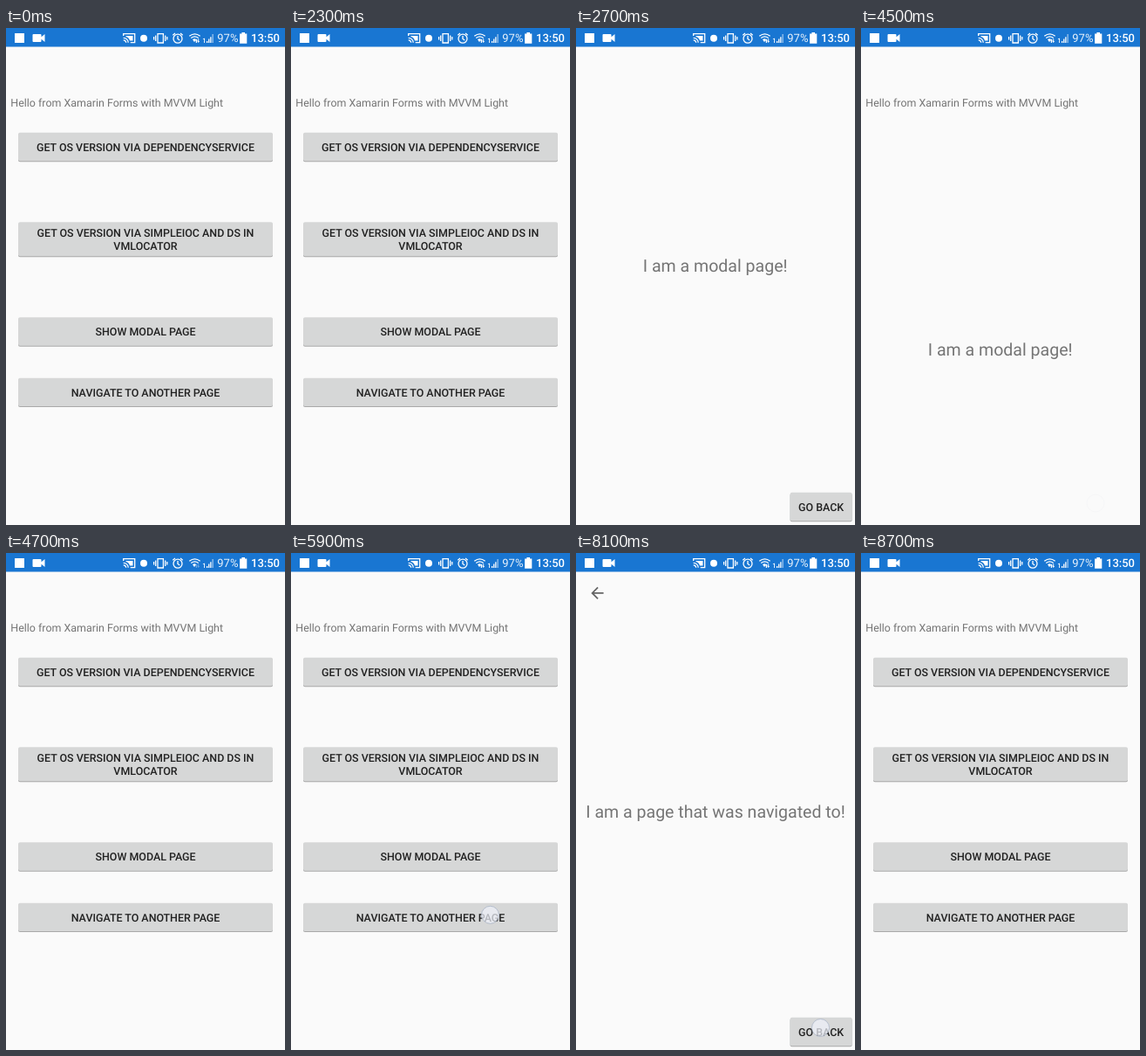
These frames come from a looping animation (320 px wide and 569 px high, 8.8 s). An HTML page:

```html
<!DOCTYPE html>
<html lang="en">
<head>
<meta charset="utf-8">
<title>App navigation</title>
<style>
html, body { margin: 0; width: 100%; height: 100%; overflow: hidden; background: #fafafa; }
svg { display: block; width: 100vw; height: 100vh; }
text { font: 12.44px Roboto, sans-serif; fill: #757575; text-rendering: geometricPrecision; }
.label { font-weight: 500; fill: #212121; text-anchor: middle; }
.title { font-size: 19.56px; text-anchor: middle; }
.face { fill: #d6d7d7; filter: drop-shadow(0 1px .7px rgba(0, 0, 0, .32)); }
#bar text { fill: #fff; font-size: 13px; }
.line { fill: none; stroke: #fff; stroke-width: 1.3; }
</style>
</head>
<body>
<svg viewBox="0 0 320 569">
  <defs><clipPath id="clip"><rect id="clipBox" rx="2"/></clipPath></defs>
  <rect width="320" height="569" fill="#fafafa"/>
  <g id="home"><text x="5.3" y="90">Hello from Xamarin Forms with MVVM Light</text></g>
  <g id="page"><text class="title" x="160" y="303.3">I am a page that was navigated to!</text></g>
  <path id="back" fill="#666" transform="translate(13.8 35.3) scale(.889)"
    d="M20 11H7.83l5.59-5.59L12 4l-8 8 8 8 1.41-1.41L7.83 13H20z"/>
  <g id="modal">
    <rect y="22" width="320" height="547" fill="#fafafa"/>
    <text class="title" x="159.7" y="278.5">I am a modal page!</text>
  </g>
  <circle id="ripple" clip-path="url(#clip)" fill="#000"/>
  <circle id="touch" r="10" fill="#eef1fa" fill-opacity=".72" stroke="#a9b3c6" stroke-opacity=".75"/>
  <g id="bar" fill="#fff">
    <rect width="320" height="21.5" fill="#1976d2"/>
    <rect x="10" y="6" width="11" height="11"/>
    <path d="M31.5 7h8q1 0 1 1v2.3l4-3.3v9l-4-3.3V15q0 1-1 1h-8q-1 0-1-1V8q0-1 1-1z"/>
    <path class="line" d="M134.7 9V6.7h13v10h-5M134.7 11.3a5.5 5.5 0 0 1 5.5 5.5M134.7 13.8a3 3 0 0 1 3 3"/>
    <path d="M137.5 9h8v5.5h-3.5q-1-3.8-4.5-4.5z"/>
    <circle cx="158" cy="11.7" r="4"/>
    <path class="line" d="M174 6.6h6.4v10.4H174zM171.7 8.5v6.5M182.7 8.5v6.5M169.6 10v3.5M184.8 10v3.5"/>
    <path class="line" d="M192 12.2a5 5 0 1 0 10 0a5 5 0 1 0-10 0M197 9v3.5l2.3 1.5M191.3 8.3l2.7-2.3M202.7 8.3L200 6"/>
    <path class="line" d="M210.3 9.3q6.2-5 12.4 0M212.3 11.5q4.2-3.2 8.4 0"/>
    <path d="M214 13q2.5-1.6 4 0l-2 3.2z"/>
    <path id="data" d="M217.8 17v-2.6h-1l1.6-2 1.6 2h-1V17zM220.2 12.5h1V15h.9l-1.4 2-1.4-2h.9z"/>
    <text x="225.3" y="17" style="font-size:7.5px;font-weight:500">1</text>
    <path d="M230 15h1.3v2H230zM232.1 12.6h1.3V17h-1.3zM234.2 10.2h1.3V17h-1.3z"/>
    <path opacity=".5" d="M236.4 7h1.5v10h-1.5z"/>
    <text x="242.3" y="16.4" opacity=".9">97%</text>
    <path d="M270.4 5h3.6v1.4h2.3v11.3h-8.2V6.4h2.3z"/>
    <text x="281" y="16.4" style="font-weight:500">13:50</text>
  </g>
</svg>
<script>
const $ = id => document.getElementById(id);
const clamp = v => Math.min(1, Math.max(0, v));

function button(parent, [x, y, w, h], ...lines) {
  const first = y + h / 2 + 4.6 - (lines.length - 1) * 7.3;
  $(parent).insertAdjacentHTML("beforeend",
    `<rect class="face" x="${x}" y="${y}" width="${w}" height="${h}" rx="2"/>` +
    lines.map((s, i) => `<text class="label" x="${x + w / 2}" y="${first + i * 14.6}">${s}</text>`).join(""));
}

const showBox = [14, 331.3, 292, 32.4], navBox = [14, 400.7, 292, 32.4], backBox = [245.6, 531.8, 71, 32.4];
button("home", [14, 119.8, 292, 32.4], "GET OS VERSION VIA DEPENDENCYSERVICE");
button("home", [14, 222.3, 292, 39], "GET OS VERSION VIA SIMPLEIOC AND DS IN", "VMLOCATOR");
button("home", showBox, "SHOW MODAL PAGE");
button("home", navBox, "NAVIGATE TO ANOTHER PAGE");
button("page", backBox, "GO BACK");
button("modal", backBox, "GO BACK");

// Finger taps: appear, release, end of fade, position, button box
const taps = [
  [1900, 2100, 2300, 232, 351, showBox],
  [4200, 4300, 4530, 269, 544, backBox],
  [5900, 6100, 6350, 228.5, 414.3, navBox],
  [8100, 8300, 8500, 280.5, 543.5, backBox]
];
const quiet = [[700, 1300], [4700, 5300], [6600, 7300]];

function set(id, attrs) {
  for (const k in attrs) $(id).setAttribute(k, attrs[k]);
}

// Fade and scale about the centre of the area below the toolbar
function pose(id, scale, opacity) {
  set(id, { opacity, transform: `translate(160 320) scale(${scale}) translate(-160 -320)` });
}

function draw(t) {
  const rise = (1 - clamp((t - 2390) / 300)) ** 6;
  const fall = clamp((t - 4374) / 300) ** 2;
  set("modal", { transform: `translate(0 ${547 * (t < 4000 ? rise : fall)})` });

  const opening = t < 8450;
  const left = 1 - clamp((t - (opening ? 6336 : 8450)) / 220);
  const fade = left ** 3, settle = left ** 5;
  if (opening) pose("home", .975 + .025 * settle, fade);
  else pose("home", 1 - .025 * settle, 1 - fade);
  pose("page", 1 + .125 * settle, opening ? 1 - fade : 0);
  set("back", { opacity: +(t > 6336 && opening) });

  const tap = taps.find(([from, , to]) => t >= from && t < to);
  set("touch", { opacity: 0 });
  set("ripple", { opacity: 0 });
  if (tap) {
    const [, up, end, cx, cy, [x, y, width, height]] = tap;
    const p = clamp((t - up) / (end - up));
    set("touch", { cx, cy, opacity: (1 - p) ** 1.3 });
    const pressed = t >= up && !(t > 4374 && t < 4600) && !(t > 8450);
    set("clipBox", { x, y, width, height });
    set("ripple", { cx, cy, r: 25 + 220 * p, opacity: pressed ? .1 * (1 - p) : 0 });
  }
  set("data", { opacity: quiet.some(([a, b]) => t >= a && t < b) ? .35 : 1 });
}

// The screen refreshes ten times a second
const start = performance.now();
function tick() {
  draw(Math.floor((performance.now() - start) % 8800 / 100) * 100);
  requestAnimationFrame(tick);
}
tick();
</script>
</body>
</html>
```
